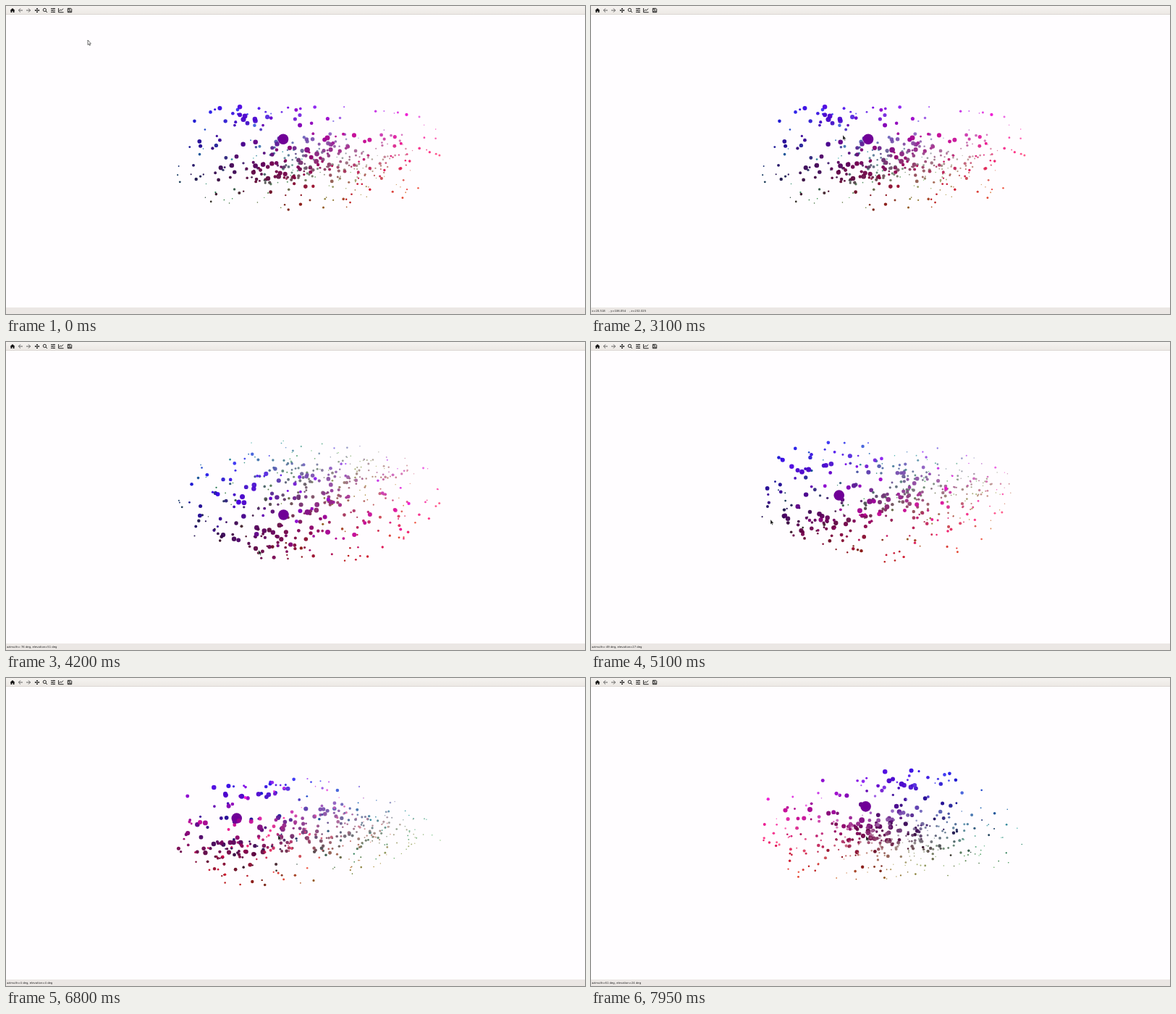
Write an HTML page with a canvas that moves like this. It is 800 px wide and 425 px high and loops after 8 s.

```html
<!DOCTYPE html>
<html>
<head>
<meta charset="utf-8">
<style>
  html, body { margin: 0; width: 100%; height: 100%; overflow: hidden; background: #fffdff; }
  canvas { display: block; width: 800px; height: 425px; }
</style>
</head>
<body>
<canvas id="stage" width="800" height="425"></canvas>
<script>
const ctx = document.getElementById('stage').getContext('2d');
const LOOP = 8000, STEP = 50;
const CENTER = { x: 418, y: 212 }, SCALE = { x: 335, y: 168 };
const START_VIEW = { azimuth: -76, elevation: -12 };
const DEGREES_PER_PIXEL = { x: .27, y: .578 };
const rad = deg => deg * Math.PI / 180;
const clamp = (v, lo, hi) => Math.min(hi, Math.max(lo, v));

// The pointer's path; dragging turns the view.
const POINTER = [
  { t: 900, x: 113, y: 47 },
  { t: 1700, x: 345, y: 215 },
  { t: 2600, x: 348, y: 180 },
  { t: 3150, x: 348, y: 178, drag: true },
  { t: 4200, x: 349, y: 287, drag: true },
  { t: 5100, x: 248, y: 245, drag: true },
  { t: 5700, x: 149, y: 175 },
  { t: 6200, x: 392, y: 206 },
  { t: 6350, x: 472, y: 186, drag: true },
  { t: 6800, x: 376, y: 217, drag: true },
  { t: 7250, x: 284, y: 226 },
  { t: 7550, x: 502, y: 193, drag: true },
  { t: 7950, x: 380, y: 218 }
];

let seed = 20;
function random() {
  seed = (seed * 1664525 + 1013904223) % 4294967296;
  return seed / 4294967296;
}
const bell = () => (random() + random() + random()) / 1.5 - 1;

const HUB = { x: -.03, y: -.3, z: .107 };
const hubDistance = (x, y, z) => Math.hypot(x - HUB.x, y - HUB.y, z - HUB.z);
const dots = [];

// Position doubles as colour: x is red, y green, z blue.
function addDot(x, y, z, r) {
  const channel = v => Math.round(255 * clamp(v, 0, 1));
  const rgb = [x + .47, (y + .25) * .95, z * 1.15 + .47].map(channel);
  dots.push({ x, y, z, r, color: `rgba(${rgb},${1 - .2 * hubDistance(x, y, z)})` });
}

// A rounded drum that gets flatter towards the green end
function inside(x, y, z) {
  const height = .47 - .65 * Math.max(0, y - .1);
  return (x * x + y * y) / .3 + (Math.abs(z) / height) ** 5 < 1;
}

function scatter(count, place) {
  while (count > 0) {
    const p = place();
    const d = hubDistance(...p);
    if (!inside(...p) || d < .13) continue;
    addDot(...p, Math.max(.7, (3.9 - 4 * d) * (.5 + .75 * random())));
    count--;
  }
}
const around = (x, y, z, size) => () =>
  [x + size * bell(), y + size * bell(), z + size * .7 * bell()];

function buildDots() {
  addDot(HUB.x, HUB.y, HUB.z, 7.3);
  scatter(150, () => [random() * 1.1 - .55, random() * 1.1 - .55, random() - .5]);
  scatter(110, () => [random() * 1.1 - .55, random() * 1.1 - .55, .65 * bell() - .05]);
  scatter(115, around(.06, .15, .01, .4));
  scatter(32, around(-.08, -.36, -.18, .28));
  scatter(18, around(-.18, -.25, .33, .25));
}

// Pointer position and the view turned by all dragging so far
function stateAt(t) {
  let { azimuth, elevation } = START_VIEW;
  let { x, y } = POINTER[0], dragging = false;
  for (let i = 0; i < POINTER.length - 1 && t >= POINTER[i].t; i++) {
    const a = POINTER[i], b = POINTER[i + 1];
    const k = clamp((t - a.t) / (b.t - a.t), 0, 1);
    const dx = (b.x - a.x) * k, dy = (b.y - a.y) * k;
    x = a.x + dx;
    y = a.y + dy;
    dragging = !!a.drag;
    if (dragging) {
      azimuth -= dx * DEGREES_PER_PIXEL.x;
      elevation += dy * DEGREES_PER_PIXEL.y;
    }
  }
  return { x, y, azimuth, elevation, dragging };
}

function drawDots({ azimuth, elevation }) {
  const ca = Math.cos(rad(azimuth)), sa = Math.sin(rad(azimuth));
  const ce = Math.cos(rad(elevation)), se = Math.sin(rad(elevation));
  dots.map(dot => {
    const near = dot.x * ca + dot.y * sa;
    const depth = near * ce + dot.z * se;
    const k = 10 / (10 - depth);
    return {
      dot, depth,
      x: CENTER.x + SCALE.x * k * (dot.y * ca - dot.x * sa),
      y: CENTER.y - SCALE.y * k * (dot.z * ce - near * se)
    };
  }).sort((p, q) => p.depth - q.depth).forEach(({ dot, x, y }) => {
    ctx.fillStyle = dot.color;
    ctx.beginPath();
    ctx.arc(x, y, dot.r, 0, 7);
    ctx.fill();
  });
}

const ICONS = [
  { x: 9, path: 'M-3.5 .3L0-3L3.5 .3H2.5V3H.7V1H-.7V3H-2.5V.3Z', filled: true },
  { x: 20, path: 'M3 0H-2.5M0-2.6L-2.6 0L0 2.6', color: '#555' },
  { x: 31, path: 'M-3 0H2.5M0-2.6L2.6 0L0 2.6', color: '#555' },
  { x: 43, path: 'M-3 0H3M0-3V3M-2-1L-3 0L-2 1M2-1L3 0L2 1M-1-2L0-3L1-2M-1 2L0 3L1 2' },
  { x: 54, path: 'M1.5-.6A2.1 2.1 0 1 1-2.7-.6A2.1 2.1 0 1 1 1.5-.6M1 1L3 3' },
  { x: 65, path: 'M-3-2.4H3M-3 0H3M-3 2.4H3M1-3.1V-1.7M-1-.7V.7M1 1.7V3.1' },
  { x: 76, path: 'M-3.4-3V2.7H3.6M-2.4 1L-.6-1L.6 .2L3-2.4' },
  { x: 88, path: 'M-2.7-2.7H1.8L2.7-1.8V2.7H-2.7ZM-1.2-2.5V-1H1.2M-1.2 2.5V.9H1.2V2.5' }
].map(icon => ({ ...icon, path: new Path2D(icon.path) }));

function drawBars() {
  const shade = ctx.createLinearGradient(0, 0, 0, 12);
  shade.addColorStop(0, '#f5f3f0');
  shade.addColorStop(1, '#ece8e4');
  ctx.fillStyle = shade;
  ctx.fillRect(0, 0, 800, 11);
  ctx.fillStyle = '#dcd7d3';
  ctx.fillRect(0, 11, 800, 1);
  ctx.fillStyle = '#ebe7e4';
  ctx.fillRect(0, 416, 800, 9);
  for (const { x, path, filled, color = '#111' } of ICONS) {
    ctx.save();
    ctx.translate(x, 6);
    ctx.fillStyle = ctx.strokeStyle = color;
    ctx.lineWidth = .9;
    filled ? ctx.fill(path) : ctx.stroke(path);
    ctx.restore();
  }
}

function statusText(t, { x, y, azimuth, elevation, dragging }) {
  if (t < 1800) return '';
  if (dragging) {
    return `azimuth=${Math.round(azimuth)} deg, elevation=${Math.round(elevation)} deg`;
  }
  const [px, py, pz] = t < 4000
    ? [20.518 + (x - 348) * .8, 106.054, 232.316 - (y - 178) * 1.6]
    : [288.534, 27.0916 + (x - 392) * .8, 98.253 - (y - 206) * 1.6];
  return `x=${px.toFixed(3)}    , y=${py.toPrecision(6)}    , z=${pz.toFixed(3)}`;
}

const ARROW = new Path2D('M0 0V6.6L1.5 5.3L2.5 7.5L3.4 7.1L2.5 5H4.4Z');
function drawPointer({ x, y }, light) {
  ctx.save();
  ctx.translate(x, y);
  ctx.fillStyle = light ? '#fff' : '#111';
  ctx.strokeStyle = light ? '#333' : '#ddd';
  ctx.lineWidth = light ? .7 : .4;
  ctx.fill(ARROW);
  ctx.stroke(ARROW);
  ctx.restore();
}

function render(now) {
  const t = Math.floor((now % LOOP) / STEP) * STEP;
  const state = stateAt(t);
  ctx.fillStyle = '#fffdff';
  ctx.fillRect(0, 0, 800, 425);
  drawDots(state);
  drawBars();
  ctx.fillStyle = '#222';
  ctx.font = '3.8px "DejaVu Sans", sans-serif';
  ctx.fillText(statusText(t, state), 1, 422);
  drawPointer(state, t < 900);
}

buildDots();
const start = performance.now();
function tick() {
  render(performance.now() - start);
  requestAnimationFrame(tick);
}
tick();
</script>
</body>
</html>
```
